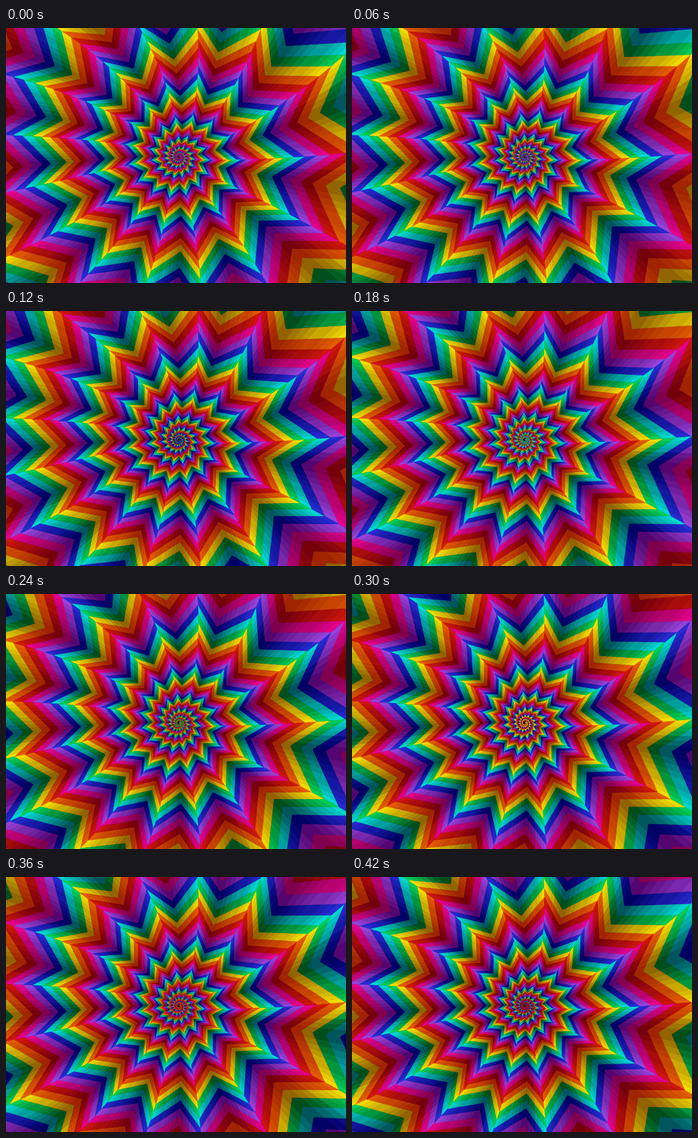
An HTML page with a canvas that plays this animation: 600x450 px, repeating every 480 ms.

```html
<!DOCTYPE html>
<html lang="en">
<head>
<meta charset="utf-8">
<title>Rainbow star tunnel</title>
<style>
  html, body { margin: 0; width: 100%; height: 100%; overflow: hidden; background: #303; }
  canvas { display: block; width: 600px; height: 450px; }
</style>
</head>
<body>
<canvas id="stage" width="600" height="450"></canvas>
<script>
const start = performance.now();
const ctx = document.getElementById('stage').getContext('2d');

const STEP_MS = 60;
const HUES = 8;
const SECTORS = 15;
const LEVELS = 8;

// Each hue runs from a dark tone at the notch to a light one at the star tip.
const palette = [
  { dark: [128, 0, 80],  light: [228, 0, 138] },
  { dark: [116, 0, 12],  light: [205, 22, 10] },
  { dark: [160, 36, 0],  light: [226, 92, 0] },
  { dark: [146, 100, 0], light: [242, 220, 0] },
  { dark: [0, 78, 28],   light: [0, 204, 86] },
  { dark: [0, 86, 92],   light: [0, 214, 208] },
  { dark: [0, 0, 100],   light: [38, 42, 208] },
  { dark: [84, 6, 112],  light: [150, 66, 216] }
];

const rad = deg => deg * Math.PI / 180;

// Log-polar plane (rho, phi), bent by a second pole far to the left.
const CENTER = { x: 305, y: 228 };
const POLE = 1400;
const TWIST = 0.06;

function toScreen(rho, phi) {
  const angle = phi + TWIST * (rho - 5);
  const size = Math.exp(rho) / POLE;
  const re = size * Math.cos(angle);
  const im = size * Math.sin(angle);
  const scale = POLE / ((1 - re) ** 2 + im * im);
  return [
    CENTER.x + scale * (re - re * re - im * im),
    CENTER.y - scale * im
  ];
}

const PERIOD = 0.627;
const BAND = PERIOD / HUES;
const SECTOR_RISE = 2 * PERIOD / SECTORS;
const FIRST_AXIS = rad(85.4);
const FIRST_RHO = 4.954 - BAND / 2;

const arms = [
  { turn: rad(10),  rise: 0.245, tiles: 7 },
  { turn: rad(-14), rise: 0.25,  tiles: 9 }
];

const mix = (a, b, t) => a + (b - a) * t;
const mixAll = (a, b, t) => a.map((v, i) => mix(v, b[i], t));

const paths = palette.map(() => Array.from({ length: LEVELS }, () => new Path2D()));

function onStage(points) {
  const xs = points.map(p => p[0]);
  const ys = points.map(p => p[1]);
  return Math.max(...xs) > -2 && Math.min(...xs) < 602 &&
         Math.max(...ys) > -2 && Math.min(...ys) < 452;
}

function addTile(path, points) {
  if (!onStage(points)) return;
  points.forEach(([x, y], i) => i ? path.lineTo(x, y) : path.moveTo(x, y));
  path.closePath();
}

function addArm(hue, rho, axis, arm) {
  const notchIn = toScreen(rho, axis);
  const notchOut = toScreen(rho + BAND, axis);
  const tipIn = toScreen(rho + arm.rise, axis + arm.turn);
  const tipOut = toScreen(rho + arm.rise + BAND, axis + arm.turn);
  for (let i = 0; i < arm.tiles; i++) {
    const t0 = i / arm.tiles;
    const t1 = (i + 1) / arm.tiles;
    const level = Math.floor((t0 + t1) / 2 * LEVELS);
    addTile(paths[hue][level], [
      mixAll(notchIn, tipIn, t0), mixAll(notchIn, tipIn, t1),
      mixAll(notchOut, tipOut, t1), mixAll(notchOut, tipOut, t0)
    ]);
  }
}

for (let sector = 0; sector < SECTORS; sector++) {
  const axis = FIRST_AXIS + sector * 2 * Math.PI / SECTORS;
  for (let band = -48; band < 36; band++) {
    const rho = FIRST_RHO - sector * SECTOR_RISE + band * BAND;
    const hue = (band + 8 * HUES) % HUES;
    arms.forEach(arm => addArm(hue, rho, axis, arm));
  }
}

function tone({ dark, light }, level) {
  const rgb = mixAll(dark, light, level / (LEVELS - 1));
  return `rgb(${rgb.map(Math.round).join(',')})`;
}

const tones = palette.map(hue => Array.from({ length: LEVELS }, (_, i) => tone(hue, i)));

// The tiles stand still; the hues travel outwards one band per step.
function draw(step) {
  ctx.fillStyle = '#303';
  ctx.fillRect(0, 0, 600, 450);
  ctx.lineWidth = 0.4;
  paths.forEach((levels, slot) => {
    const hue = (slot + 1 - step + HUES) % HUES;
    levels.forEach((path, level) => {
      ctx.fillStyle = ctx.strokeStyle = tones[hue][level];
      ctx.fill(path);
      ctx.stroke(path);
    });
  });
}

let shown = -1;

function tick() {
  const step = Math.floor((performance.now() - start) / STEP_MS) % HUES;
  if (step !== shown) {
    draw(step);
    shown = step;
  }
  requestAnimationFrame(tick);
}

tick();
</script>
</body>
</html>
```
